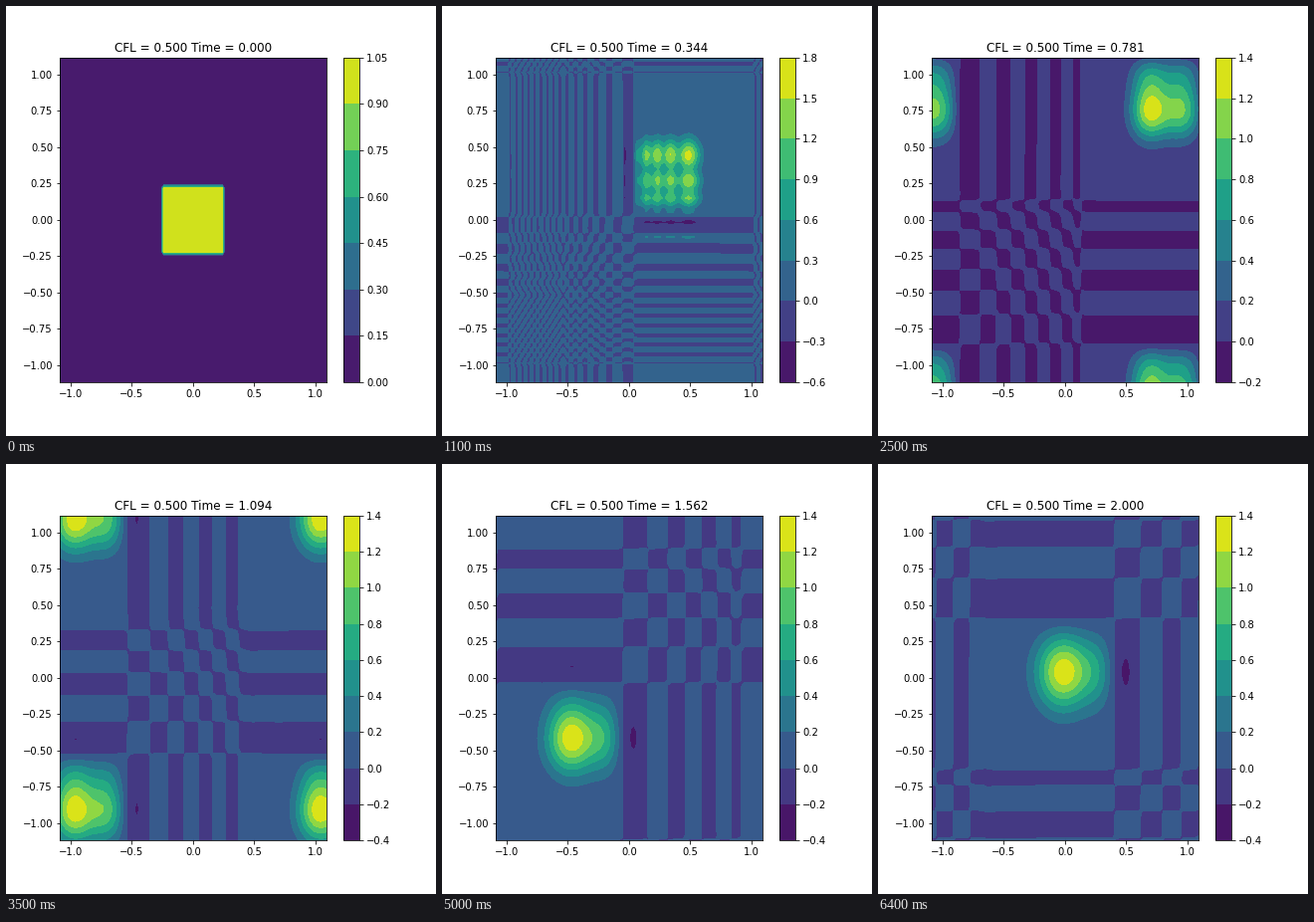
These frames come from a looping animation (432 by 432 pixels, 6.5 s). A matplotlib script:

```python
import numpy as np
import matplotlib.pyplot as plt
from matplotlib.animation import FuncAnimation

plt.rcParams.update({"font.family": "DejaVu Sans", "font.size": 10})

NX, NY, GHOST = 80, 60, 4
DX, DY = 2 / NX, 2 / NY
CFL = 0.5
FRAME_DT = 1 / 32
FRAMES = 65
SWITCH = 18  # first frame of the upwind run


def centres(n, h):
    return -1 + (np.arange(-GHOST, n + GHOST) + 0.5) * h


X, Y = centres(NX, DX), centres(NY, DY)


def central(q, axis):
    return (np.roll(q, -1, axis) - np.roll(q, 1, axis)) / 2


def upwind(q, axis):
    return (3 * q - 4 * np.roll(q, 1, axis) + np.roll(q, 2, axis)) / 2


def step(q, dt, diff):
    """Third-order Runge-Kutta step of q_t + q_x + q_y = 0."""
    v = q
    for m in (3, 2, 1):
        v = q - dt / m * (diff(v, 1) / DX + diff(v, 0) / DY)
    return v


def run(diff, count):
    x, y = X[GHOST:-GHOST], Y[GHOST:-GHOST]
    q = np.outer(np.abs(y) < 0.24, np.abs(x) < 0.245).astype(float)
    dt_max = CFL / (1 / DX + 1 / DY)
    full = int(FRAME_DT / dt_max)
    steps = [dt_max] * full + [FRAME_DT - full * dt_max]
    states = [q]
    for _ in range(count):
        for dt in steps:
            q = step(q, dt, diff)
        states.append(q)
    return states


centred_run = run(central, SWITCH - 2)
upwind_run = run(upwind, FRAMES - 1)

fig = plt.figure(figsize=(6, 6), dpi=72, facecolor="white")
fig.subplots_adjust(left=0.125, right=0.9, bottom=0.125, top=0.88)


def draw(k):
    if k < SWITCH:
        n = min(k, SWITCH - 2)
        q = centred_run[n]
    else:
        n = k
        q = upwind_run[n]
    fig.clear()
    ax = fig.add_subplot()
    filled = ax.contourf(X, Y, np.pad(q, GHOST, mode="wrap"), cmap="viridis")
    fig.colorbar(filled, ax=ax)
    ax.set_title(f"CFL = {CFL:.3f} Time = {n * FRAME_DT:.3f}")
    return []


anim = FuncAnimation(fig, draw, frames=FRAMES, interval=100,
                     repeat=True, repeat_delay=0, blit=False)
plt.show()
```
